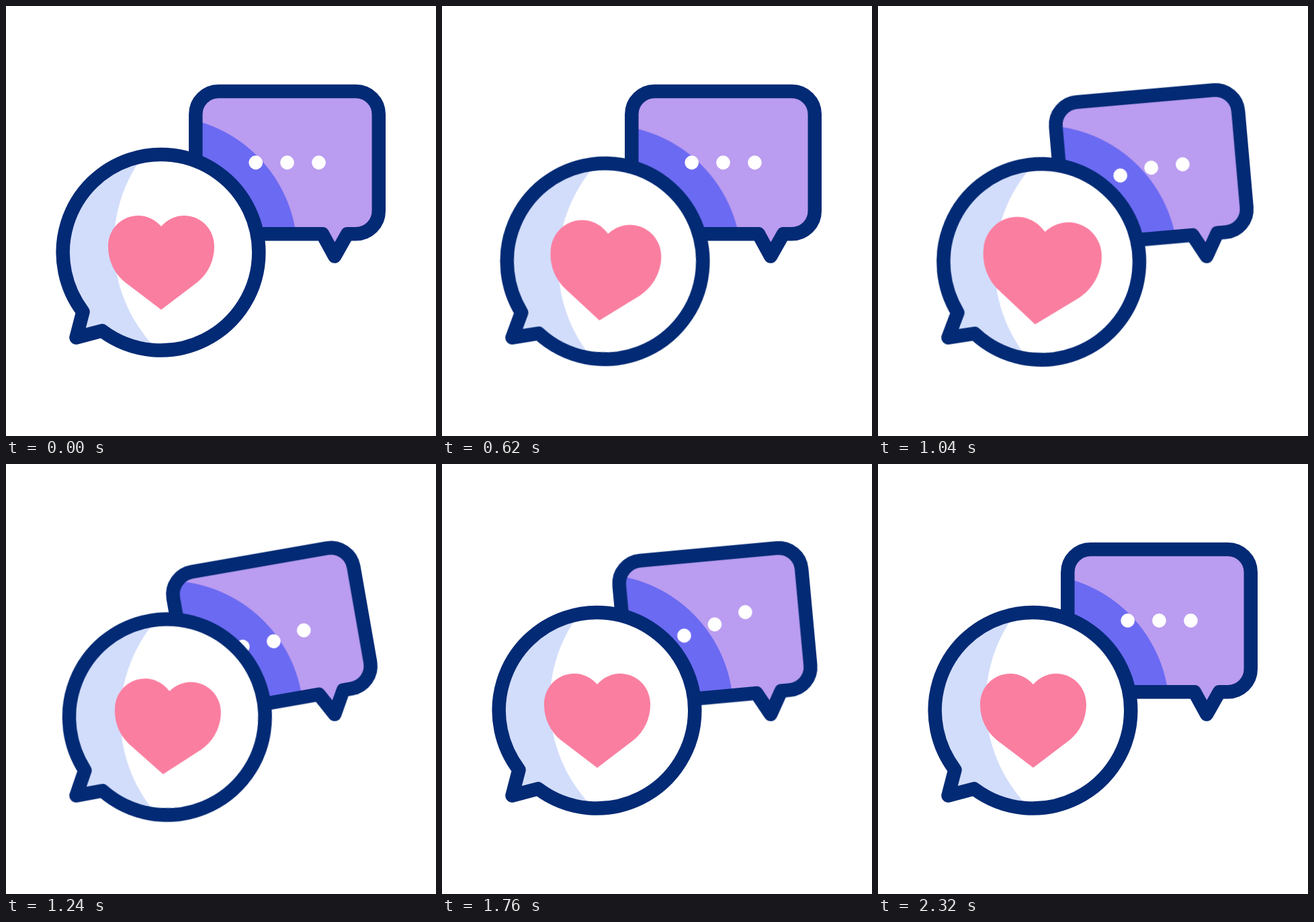
These frames come from a looping animation (640 px wide and 640 px high, 2.4 s). An HTML page:

```html
<!DOCTYPE html>
<html lang="en">
<head>
<meta charset="utf-8">
<title>Chat bubbles</title>
<style>
  html, body { margin: 0; width: 100%; height: 100%; overflow: hidden; background: #fff; }
  svg { display: block; width: 100%; height: 100%; }

  .love, .chat, .heart, .dot {
    animation: 2400ms cubic-bezier(.333, 0, .667, 1) infinite;
  }
  .love { transform-origin: 104.5px 493.5px; animation-name: love; }
  .chat { transform-origin: 489.2px 372.5px; animation-name: chat; }
  .heart { transform-origin: 231px 382px; animation-name: beat; }
  .dot { animation-name: hop; }
  .dot:nth-child(2) { animation-delay: 100ms; }
  .dot:nth-child(3) { animation-delay: 200ms; }

  .line { fill: none; stroke: #032a75; stroke-width: 20.5; stroke-linejoin: round; }

  @keyframes love {
    0%, 8.333% { transform: rotate(0deg); }
    20.833% { transform: rotate(15deg); }
    33.333% { transform: rotate(-11deg); }
    45.833% { transform: rotate(8deg); }
    58.333%, 100% { transform: rotate(0deg); }
  }
  @keyframes chat {
    0%, 37.5% { transform: rotate(0deg); }
    50% { transform: rotate(-11deg); }
    62.5% { transform: rotate(10deg); }
    75% { transform: rotate(-6deg); }
    87.5%, 100% { transform: rotate(0deg); }
  }
  /* four beats, quick rise and slower fall */
  @keyframes beat {
    0%, 8.333%, 30.208%, 52.083%, 73.958%, 95.833%, 100% { transform: scale(1); }
    17.083%, 18.833%, 38.958%, 40.708%, 60.833%, 62.583%, 82.708%, 84.458% { transform: scale(1.137); }
  }
  @keyframes hop {
    0%, 37.5% { transform: translateY(0); }
    50% { transform: translateY(18.7px); }
    62.5% { transform: translateY(-18.7px); }
    75% { transform: translateY(12.6px); }
    87.5%, 100% { transform: translateY(0); }
  }
</style>
</head>
<body>
<svg viewBox="0 0 640 640">
  <defs>
    <!-- two arcs through the rightmost point keep the circle centred on 230.5, 366.8 -->
    <path id="loveShape" d="M114.5 455.1 L104.5 493.5 L143 483.4 A145.8 145.8 0 0 0 376.3 366.8 A145.8 145.8 0 1 0 114.5 455.1 Z"/>
    <path id="chatShape" d="M316.5 127 H520.6 A34.2 34.2 0 0 1 554.8 161.2 V305.1 A34.2 34.2 0 0 1 520.6 339.3 H508 L489.2 372.5 L471 339.3 H316.5 A34.2 34.2 0 0 1 282.3 305.1 V161.2 A34.2 34.2 0 0 1 316.5 127 Z"/>
    <clipPath id="loveClip"><use href="#loveShape"/></clipPath>
    <clipPath id="chatClip"><use class="chat" href="#chatShape"/></clipPath>
  </defs>

  <use class="chat" href="#chatShape" fill="#ba9cf0"/>
  <!-- shade follows the round bubble but stays inside the square one -->
  <g clip-path="url(#chatClip)">
    <circle class="love" cx="230.5" cy="366.8" r="203" fill="#6b6af2"/>
  </g>
  <g class="chat">
    <use class="line" href="#chatShape"/>
    <g fill="#fff">
      <circle class="dot" cx="371.7" cy="233" r="10.4"/>
      <circle class="dot" cx="418.5" cy="233" r="10.4"/>
      <circle class="dot" cx="465.5" cy="233" r="10.4"/>
    </g>
  </g>

  <g class="love">
    <use href="#loveShape" fill="#d2ddfb"/>
    <g clip-path="url(#loveClip)">
      <circle cx="383" cy="355" r="222.5" fill="#fff"/>
    </g>
    <use class="line" href="#loveShape"/>
    <path class="heart" fill="#fa7ea0" d="M231 328 C222 318 210 312 197 312 C172 312 152 332 152 358 C152 379 161 398 177 411 L231 452 L285 411 C301 398 310 379 310 358 C310 332 290 312 265 312 C252 312 240 318 231 328 Z"/>
  </g>
</svg>
</body>
</html>
```
